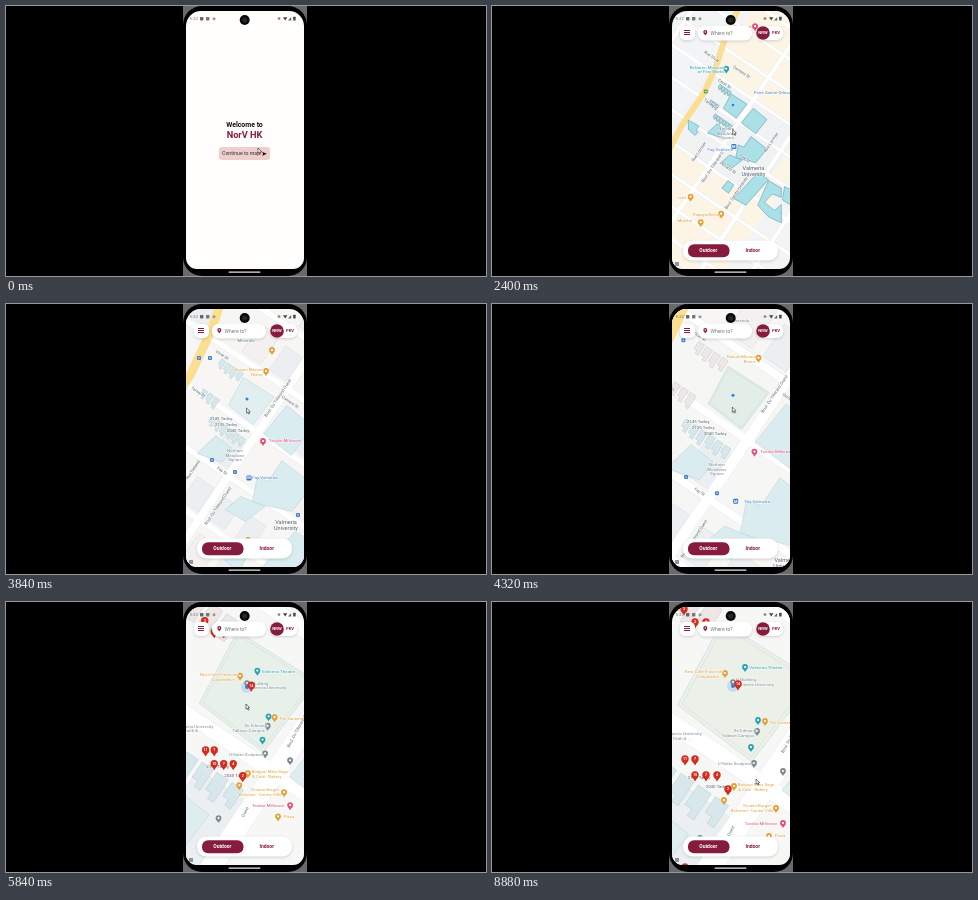
An HTML page with a canvas that plays this animation: 480 px wide and 270 px high, repeating every 8.96 s.

```html
<!DOCTYPE html>
<html lang="en">
<head>
<meta charset="utf-8">
<title>Campus map</title>
<style>
html, body { margin: 0; width: 100%; height: 100%; overflow: hidden; background: #000; }
canvas { display: block; width: 480px; height: 270px; }
</style>
</head>
<body>
<canvas id="stage"></canvas>
<script>
const LOOP = 8960, STEP = 80, MAP_START = 640;
const canvas = document.getElementById('stage');
const ctx = canvas.getContext('2d');
const ratio = window.devicePixelRatio || 1;
canvas.width = 480 * ratio;
canvas.height = 270 * ratio;

const MAROON = '#861c3d', TEAL = '#2aa3b4', PINK = '#e0527c', ORANGE = '#e5a03a';
const BLUE = '#4a80cc', GREY = '#7b8a93', DARK = '#52606a', RED = '#d32c1e';
const CROSS = 0.59, ALONG = -0.98;

// Linear interpolation through [time, value] pairs.
function track(t, keys) {
  if (t <= keys[0][0]) return keys[0][1];
  for (let i = 1; i < keys.length; i++) {
    const [t0, v0] = keys[i - 1], [t1, v1] = keys[i];
    if (t < t1) return v0 + (v1 - v0) * (t - t0) / (t1 - t0);
  }
  return keys[keys.length - 1][1];
}

const zoomAt = t => Math.exp(track(t, [
  [1360, Math.log(0.2)], [2960, Math.log(0.32)], [3840, Math.log(0.53)],
  [4880, 0], [6300, Math.log(1.58)]]));
const centreY = t => track(t, [[1360, 101], [2960, 98], [3840, 95], [4880, 87], [6300, 84]]);
const CENTRE_X = 241;

function text(str, x, y, color, size = 4.6, weight = 400, align = 'center') {
  ctx.font = `${weight} ${size}px Roboto, sans-serif`;
  ctx.textAlign = align;
  ctx.textBaseline = 'middle';
  ctx.fillStyle = color;
  ctx.fillText(str, x, y);
}

function haloText(str, x, y, color, size, weight) {
  ctx.font = `${weight} ${size}px Roboto, sans-serif`;
  ctx.textAlign = 'center';
  ctx.textBaseline = 'middle';
  ctx.strokeStyle = 'rgba(255,255,255,.7)';
  ctx.lineWidth = 1;
  ctx.lineJoin = 'round';
  ctx.strokeText(str, x, y);
  text(str, x, y, color, size, weight);
}

function box(x, y, w, h, r, color) {
  ctx.beginPath();
  ctx.roundRect(x, y, w, h, r);
  ctx.fillStyle = color;
  ctx.fill();
}

function disc(x, y, r, color) {
  ctx.beginPath();
  ctx.arc(x, y, r, 0, 7);
  ctx.fillStyle = color;
  ctx.fill();
}

function polygon(points, color, outline) {
  ctx.beginPath();
  points.forEach(([x, y]) => ctx.lineTo(x, y));
  ctx.closePath();
  ctx.fillStyle = color;
  ctx.fill();
  if (outline) {
    ctx.strokeStyle = outline;
    ctx.stroke();
  }
}

function polyline(points, width, color) {
  ctx.beginPath();
  points.forEach(([x, y]) => ctx.lineTo(x, y));
  ctx.lineWidth = width;
  ctx.lineJoin = 'round';
  ctx.strokeStyle = color;
  ctx.stroke();
}

function pin(x, y, color, r = 2.9) {
  polygon([[x - r * .8, y + r * .5], [x + r * .8, y + r * .5], [x, y + r * 1.75]], color);
  disc(x, y, r, color);
  disc(x, y, r * .38, '#fff');
}

function numberPin(x, y, n) {
  pin(x, y, RED, 3.7);
  disc(x, y, 2, RED);
  text(n, x, y + .2, '#fff', 3.6, 700);
}

// Campus buildings, in map units from the location dot.
const HALL = [[-7, -41], [51, -4], [12, 48], [-35, 12]];
const CAMPUS = [
  [[75, 12], [125, 53], [84, 106], [31, 66]],
  [[-165, 55], [-125, 78], [-136, 92], [-128, 100], [-140, 112], [-164, 90]],
  [[-59, 69], [-28, 94], [-47, 119], [-94, 103]],
  [[19, 147], [40, 155], [66, 116], [125, 162], [84, 212], [10, 195]],
  [[-12, 184], [34, 203], [-3, 231], [-41, 209]],
  [[-19, 278], [3, 294], [-16, 325], [-41, 306]],
  [[91, 250], [131, 275], [47, 369], [3, 344]],
  [[131, 278], [178, 306], [178, 340], [144, 328], [116, 359], [153, 388], [178, 366],
    [178, 434], [131, 412], [91, 369]],
  [[190, 300], [245, 325], [225, 375], [182, 350]]
];

// Labels by zoom level, at stage positions for that level's reference time:
// [text, x, y, colour, pin x, pin y]
const LEVELS = [
  { at: 1360, from: 0, to: 2200,
    labels: [
      ['The Plaz-Orlemont', 238, 41, PINK, 256, 41], ['Belvoren', 243, 45.5, PINK],
      ['Belvoren Museum', 217, 72, TEAL, 236.5, 73], ['of Fine Works', 221, 76.5, TEAL],
      ['Poire Sainte-Orlande', 261, 92, BLUE, 285, 90], ['Fay-Valmeria', 226, 132, BLUE],
      ['Papaya Bay', 217, 179, ORANGE, 233, 178], ['Ferrandian Centre', 227, 215, TEAL, 245, 215],
      ['for Stonework', 228, 219.5, TEAL], ['', 0, 0, GREY, 200, 15], ['', 0, 0, BLUE, 199, 195],
      ['Arcade General', 239, 257, GREY, 218, 257], ['of the Park', 237, 261, GREY]],
    campus: [257, 147], metro: [242, 132], badges: [[193, 133], [294, 228]],
    roads: [['Tarley St', 187, 43, CROSS], ['Rue Vicar', 203, 84, CROSS], ['Osmere St', 198, 100, CROSS],
      ['Rue Sainte-Orlande O', 276, 68, CROSS], ['Boul. Du Tillerand O', 220, 150, CROSS],
      ['Rue Pelland', 200, 152, ALONG], ['Rue Pelland', 286, 202, ALONG], ['Rue Tourvel', 197, 225, ALONG],
      ['Av. Lormier', 262, 205, ALONG]] },
  { at: 2960, from: 2200, to: 3450,
    labels: [
      ['Belvoren', 255, 6, PINK, 267, 5], ['Belvoren Museum', 214, 54, TEAL, 233, 55],
      ['of Fine Works', 218, 58.5, TEAL], ['Poire Sainte-Orlande', 289, 84, BLUE],
      ['Norham', 233, 126, GREY], ['Meadows', 233, 130.5, GREY], ['Square', 234, 135, GREY],
      ['Fay-Valmeria', 227, 147, BLUE], ['uka', 183, 207, ORANGE, 191, 206],
      ['Papaya Bistro', 212, 227, ORANGE, 227, 226], ['Marche', 187, 235, ORANGE, 203, 236]],
    campus: [265, 173], metro: [242, 147], badges: [[209, 82]],
    roads: [['Rue Vicar', 216, 41, CROSS], ['Tarley St', 215, 97, CROSS], ['Osmere St', 251, 59, CROSS],
      ['Crest St', 231, 73, CROSS], ['Fay St', 255, 161, CROSS], ['Pelland St', 235, 172, CROSS],
      ['Boul. Du Tillerand O', 217, 171, ALONG], ['Boul. Sainte-Orlande O', 246, 200, ALONG],
      ['Rue Lormier', 201, 153, ALONG], ['Rue Lormier', 286, 142, ALONG]] },
  { at: 3840, from: 3450, to: 4400,
    labels: [
      ['Kazuni Manara', 243, 66, ORANGE, 260, 67], ['Bistro', 251, 70.5, ORANGE],
      ['', 0, 0, ORANGE, 266, 46], ['Merenda', 240, 37, GREY], ['2145 Tarley', 215, 115, DARK],
      ['2135 Tarley', 220, 121, DARK], ['2040 Tarley', 232, 127, DARK],
      ['Norham', 229, 147, GREY], ['Meadows', 229, 151.5, GREY], ['Square', 229, 156, GREY],
      ['Tandor Millerove', 279, 137, PINK, 257, 137], ['Fay-Valmeria', 259, 174, BLUE],
      ['', 0, 0, ORANGE, 242, 236]],
    campus: [280, 218], metro: [243, 174],
    badges: [[193, 54, BLUE], [204, 54, BLUE], [206, 156, BLUE], [229, 168, BLUE], [292, 211, BLUE]],
    roads: [['Vicar St', 216, 51, CROSS], ['Tarley St', 192, 88, CROSS], ['Osmere St', 284, 98, CROSS],
      ['Fay St', 216, 167, CROSS], ['Rue Pelland', 187, 166, ALONG],
      ['Boul. Du Tillerand Ouest', 272, 94, ALONG], ['Boul. Du Tillerand Ouest', 212, 202, ALONG]] },
  { at: 4880, from: 4400, to: 5600,
    labels: [
      ['H Building', 253, 82, GREY], ['Valmeria University', 261, 86.5, GREY],
      ['Merenda', 290, 39, ORANGE, 278, 39], ['Tarley', 186, 118, GREY],
      ['2135 Tarley', 201, 138, DARK], ['2045 Tarley', 218, 149, DARK], ['2040 Tarley', 229, 154, DARK],
      ['', 0, 0, TEAL, 257, 109], ['', 0, 0, BLUE, 196, 63],
      ['Tandor Millerove', 295, 175, PINK, 273, 175], ['Valmeria University', 196, 183, GREY, 220, 184],
      ['Library Square (LS)', 197, 187.5, GREY], ['', 0, 0, ORANGE, 196, 208],
      ['Maison', 257, 228, DARK], ['Tillerand Hotel', 258, 232.5, DARK],
      ['Luke Maison', 245, 261, GREY, 231, 260]],
    badges: [[196, 221, BLUE], [219, 230, BLUE], [190, 7, BLUE]],
    numbers: [[206, 36, 2], [197, 124, 7], [197, 133, 4], [217, 143, 12], [231, 143, 7], [238, 153, 2], [245, 85, 14]],
    roads: [['Tarley St', 185, 103, CROSS], ['Boul. Du Tillerand Ouest', 239, 189, -1.08]] },
  { at: 7360, from: 5600, to: LOOP,
    labels: [
      ['Nest Café Fraternity', 212, 70, ORANGE, 233, 71], ['Cooperative', 216, 74.5, ORANGE],
      ['Valmeria Theatre', 274, 66, TEAL, 253, 65], ['H Building', 254, 78, GREY],
      ['Valmeria University', 263, 82.5, GREY], ['The Lantern', 289, 121, ORANGE, 273, 119],
      ['', 0, 0, TEAL, 266, 118], ['Sir Edmund', 253, 129, GREY, 265, 129],
      ['Tallows Campus', 246, 133.5, GREY], ['', 0, 0, TEAL, 259, 145],
      ['Valmeria University', 191, 132, GREY], ['Faith & ...', 190, 136.5, GREY],
      ['U-Gatto Sculpture', 243, 162, GREY, 262, 161], ['', 0, 0, GREY, 291, 169],
      ['2135 Tarley', 207, 176, DARK], ['2040 Tarley', 225, 185, DARK],
      ['Bonjour Miss Sage', 264, 183, ORANGE, 242, 184], ['& Café - Bakery', 261, 187.5, ORANGE],
      ['Orvano Burger', 265, 204, ORANGE, 284, 206], ['Belvoren - Centre Ville', 260, 208.5, ORANGE],
      ['', 0, 0, ORANGE, 232, 198], ['Tandor Millerove', 269, 222, PINK, 291, 221],
      ['Pizza', 288, 234, ORANGE, 277, 234], ['', 0, 0, GREY, 208, 236]],
    badges: [],
    numbers: [[192, 7, 3], [203, 20, 2], [214, 20, 4], [193, 157, 11], [203, 157, 7], [203, 173, 10], [214, 173, 7],
      [225, 173, 4], [236, 187, 2], [246, 82, 14], [193, 265, 5]],
    roads: [['Boul. Du Tillerand Ouest', 301, 131, -1.08], ['Ouest', 239, 229, -1.08]] }
];

// Streets follow two perpendicular axes; avenues are given by distance from the dot.
const AVENUES = [-500, -320, 52, 240, 400, 560, 760];
const MAIN_ROADS = [
  [[-460, 520], [-235, 165], [-190, 78], [-107, -45], [-65, -135], [-28, -250], [60, -445], [220, -800]],
  [[420, 440], [280, 580], [135, 720], [0, 855]]
];
const EXTENT = 1400;

function drawGround(t, zoom) {
  const cream = track(t, [[1360, 1], [2960, .9], [3840, .2], [4880, .08]]);
  const detail = track(t, [[2800, 0], [3700, 1]]);
  ctx.save();
  ctx.transform(.83, .56, .56, -.83, 0, 0);
  ctx.globalAlpha = cream;
  ctx.fillStyle = '#fdf6e6';
  ctx.fillRect(-140, -EXTENT, 460, 2 * EXTENT);
  ctx.fillStyle = '#eff3f5';
  ctx.fillRect(-140, -240, 400, 300);
  ctx.globalAlpha = detail;
  ctx.lineWidth = .6 / zoom;
  ctx.strokeStyle = '#dde3e4';
  for (let row = -5; row <= 4; row++) {
    for (let col = -6; col <= 6; col++) {
      const seed = Math.abs(Math.sin(row * 12.9 + col * 78.2) * 437) % 1;
      const x = 66 + col * 62, y = -30 + row * 99;
      if (seed < .35 || (row === 0 && col > -3 && col < 1) || x < -110 && x > -165) continue;
      ctx.fillStyle = seed > .75 ? '#f5f0f0' : '#ebeff1';
      ctx.beginPath();
      ctx.rect(x, y, 30 + seed * 16, 38 + seed * 30);
      ctx.fill();
      ctx.stroke();
    }
  }
  ctx.globalAlpha = 1;
  for (const casing of [.7 / zoom, 0]) {
    const color = casing ? '#e2e6e9' : '#fff';
    for (let k = -9; k <= 9; k++) {
      const y = -41 + 99 * k;
      polyline([[-EXTENT, y], [EXTENT, y]], 11 + casing, color);
    }
    AVENUES.forEach(x => polyline([[x, -EXTENT], [x, EXTENT]], 15 + casing, color));
  }
  ctx.restore();
  MAIN_ROADS.forEach(road => {
    polyline(road, 11 + 2.9 / zoom, '#f0dda6');
    polyline(road, 11 + 2.1 / zoom, '#fbdf8e');
  });
}

function drawRow(x, y, count, fill, outline) {
  for (let i = 0; i < count; i++) {
    ctx.save();
    ctx.translate(x + i * 11, y + i * 7.4);
    ctx.rotate(CROSS);
    const depth = 17 + i * 7 % 5;
    polygon([[0, 0], [10, 0], [10, depth], [5, depth], [5, depth - 5], [0, depth - 5]], fill, outline);
    ctx.restore();
  }
}

function drawBuildings(t, zoom) {
  const tint = track(t, [[3000, 1], [3600, .32], [4880, .28], [6300, .2]]);
  const outline = `rgba(85,145,158,${Math.max(.28, tint * .85)})`;
  const cyan = alpha => `rgba(170,224,231,${alpha})`;
  ctx.lineWidth = .6 / zoom;
  CAMPUS.forEach(shape => {
    polygon(shape, '#eef1f2');
    polygon(shape, cyan(tint), outline);
  });
  const rowFill = t < 3300 ? '#b2e1e8' : '#d8e7eb';
  const houseFill = t < 4000 ? rowFill : '#f0e6e6';
  drawRow(-66, 33, 6, rowFill, outline);
  drawRow(-48, -76, 4, houseFill, outline);
  drawRow(-82, -19, 3, houseFill, outline);
  const hallTint = track(t, [[3000, 1], [3600, .2], [4880, .12], [6300, .04]]);
  polygon(HALL, t < 4200 ? '#eef1f2' : '#edf1e9');
  polygon(HALL, cyan(hallTint), outline);
  if (t > 4200) {
    ctx.strokeStyle = '#d3ddd5';
    ctx.beginPath();
    HALL.forEach(([x, y]) => ctx.lineTo(5 + (x - 5) * .93, 3 + (y - 3) * .93));
    ctx.closePath();
    ctx.stroke();
  }
}

function drawLabels(t, zoom, cy) {
  const level = LEVELS.find(l => t >= l.from && t < l.to);
  const k = zoom / zoomAt(level.at), refY = centreY(level.at);
  const place = (x, y) => [CENTRE_X + (x - CENTRE_X) * k, cy + (y - refY) * k];

  level.roads.forEach(([name, x, y, angle]) => {
    ctx.save();
    ctx.translate(...place(x, y));
    ctx.rotate(angle);
    haloText(name, 0, 0, '#5a656d', 4.2, 400);
    ctx.restore();
  });
  level.badges.forEach(([x, y, color = '#63a352']) => {
    const [px, py] = place(x, y);
    box(px - 2, py - 2, 4, 4, 1, color);
    disc(px, py, .7, '#fff');
  });
  // A label keeps its distance to its own pin while the map scales.
  let dx = 0, dy = 0;
  level.labels.forEach(([name, x, y, color, px, py]) => {
    if (px !== undefined) {
      const [sx, sy] = place(px, py);
      dx = sx - px;
      dy = sy - py;
      pin(sx, sy, color);
    } else {
      const [sx, sy] = place(x, y);
      if (Math.abs(sx - x - dx) + Math.abs(sy - y - dy) > 12) { dx = sx - x; dy = sy - y; }
    }
    if (name) haloText(name, x + dx, y + dy, color, 4.4, 400);
  });
  if (level.metro) {
    const [x, y] = place(...level.metro);
    box(x - 2.5, y - 2.5, 5, 5, 1, '#3479c8');
    text('M', x, y + .2, '#fff', 4, 700);
  }
  if (level.campus) {
    const [x, y] = place(...level.campus);
    haloText('Valmeria', x, y, DARK, 5.5, 400);
    haloText('University', x, y + 6, DARK, 5.5, 400);
  }
  if (t < 4400) {
    disc(CENTRE_X, cy, 2.1, '#d9eaff');
    disc(CENTRE_X, cy, 1.5, '#397fd1');
  } else {
    disc(CENTRE_X, cy, 6, 'rgba(110,165,235,.28)');
    pin(CENTRE_X, cy - 4, GREY, 2.7);
    disc(CENTRE_X, cy, 2, '#397fd1');
  }
  (level.numbers || []).forEach(([x, y, n]) => numberPin(...place(x, y), n));
}

function drawMap(t) {
  const zoom = zoomAt(t), cy = centreY(t);
  ctx.fillStyle = t < 2200 ? '#eceff1' : t < 3450 ? '#f2f4f5' : '#f6f6f6';
  ctx.fillRect(178, 0, 124, 270);
  ctx.save();
  ctx.translate(CENTRE_X, cy);
  ctx.scale(zoom, zoom);
  drawGround(t, zoom);
  drawBuildings(t, zoom);
  ctx.restore();
  drawLabels(t, zoom, cy);
  box(183, 256, 4, 4, 0, '#8d959a');
}

function shadowBox(x, y, w, h, r) {
  ctx.save();
  ctx.shadowColor = 'rgba(0,0,0,.16)';
  ctx.shadowBlur = 3 * ratio;
  ctx.shadowOffsetY = ratio;
  box(x, y, w, h, r, '#fff');
  ctx.restore();
}

function drawControls() {
  shadowBox(188, 20, 15, 14, 5);
  for (let i = 0; i < 3; i++) box(192, 24 + i * 2, 6, 1, 0, MAROON);
  shadowBox(206, 19.5, 54, 15, 7);
  pin(213.3, 26, MAROON, 2);
  text('Where to?', 218.5, 27.2, '#777', 5, 400, 'left');
  shadowBox(264, 20, 27.5, 14, 7);
  disc(271, 27, 6.8, MAROON);
  text('NRW', 271, 27.2, '#fff', 4.2, 700);
  text('PKV', 284, 27.2, MAROON, 4.2, 700);
  shadowBox(191, 234.5, 95, 20, 9);
  box(196, 238.3, 41.5, 13, 6, MAROON);
  text('Outdoor', 216.3, 245, '#fff', 5, 700);
  text('Indoor', 260.7, 245, MAROON, 5, 700);
}

function drawWelcome() {
  ctx.fillStyle = '#fffefd';
  ctx.fillRect(178, 0, 124, 270);
  text('Welcome to', 238.5, 118.6, '#111', 6.9, 700);
  text('NorV HK', 238.5, 129.6, MAROON, 9.2, 700);
  box(213, 141, 51, 13, 3, '#efcfcd');
  text('Continue to map', 216, 147.8, '#3a2a2c', 5.2, 400, 'left');
  polygon([[256, 145.7], [260.8, 147.8], [256, 149.9], [257.2, 147.8]], '#111');
}

function drawStatusBar() {
  text('5:32', 183.5, 12.8, '#777', 4.4, 400, 'left');
  box(194, 11, 3.4, 3.4, .6, '#666');
  box(200, 11, 3.4, 3.4, .6, '#777');
  disc(208, 12.7, 1.5, '#999');
  disc(273, 12.6, 1.4, '#888');
  polygon([[277, 11.3], [281.4, 11.3], [279.2, 14.4]], '#444');
  polygon([[282, 14.4], [285.2, 14.4], [285.2, 11]], '#666');
  box(287.2, 10.8, 2.4, 3.8, .5, '#444');
}

function drawCursor(t) {
  const x = track(t, [[300, 252], [1360, 240], [2960, 241], [4880, 240], [6300, 240], [7360, 264]]);
  const y = track(t, [[300, 142], [1360, 141], [2200, 141], [2600, 106], [3840, 104], [4880, 102], [6300, 102], [7360, 177]]);
  ctx.lineWidth = .6;
  polygon([[x, y], [x, y + 5.2], [x + 1.2, y + 4.1], [x + 2.1, y + 6], [x + 3, y + 5.6],
    [x + 2.2, y + 3.8], [x + 3.7, y + 3.7]], '#fff', '#222');
}

function draw(t) {
  ctx.setTransform(ratio, 0, 0, ratio, 0, 0);
  ctx.fillStyle = '#000';
  ctx.fillRect(0, 0, 480, 270);
  // The phone sits on a grey panel that shows only at its corners.
  box(177, 0, 124, 270, 0, '#6a6a6a');
  box(177, 0, 124, 270, 19, '#000');

  ctx.save();
  ctx.beginPath();
  ctx.roundRect(180, 5, 118, 258, [15, 15, 11, 11]);
  ctx.clip();
  if (t < MAP_START) drawWelcome();
  else {
    drawMap(t);
    drawControls();
  }
  drawStatusBar();
  drawCursor(t);
  ctx.restore();

  disc(238.7, 14, 5, '#080808');
  disc(238.7, 14, 2.6, '#24282b');
  box(222.5, 265.4, 32, 1.3, .6, '#e8e8e8');
}

function frame() {
  draw(Math.floor(performance.now() % LOOP / STEP) * STEP);
  requestAnimationFrame(frame);
}
frame();
</script>
</body>
</html>
```
